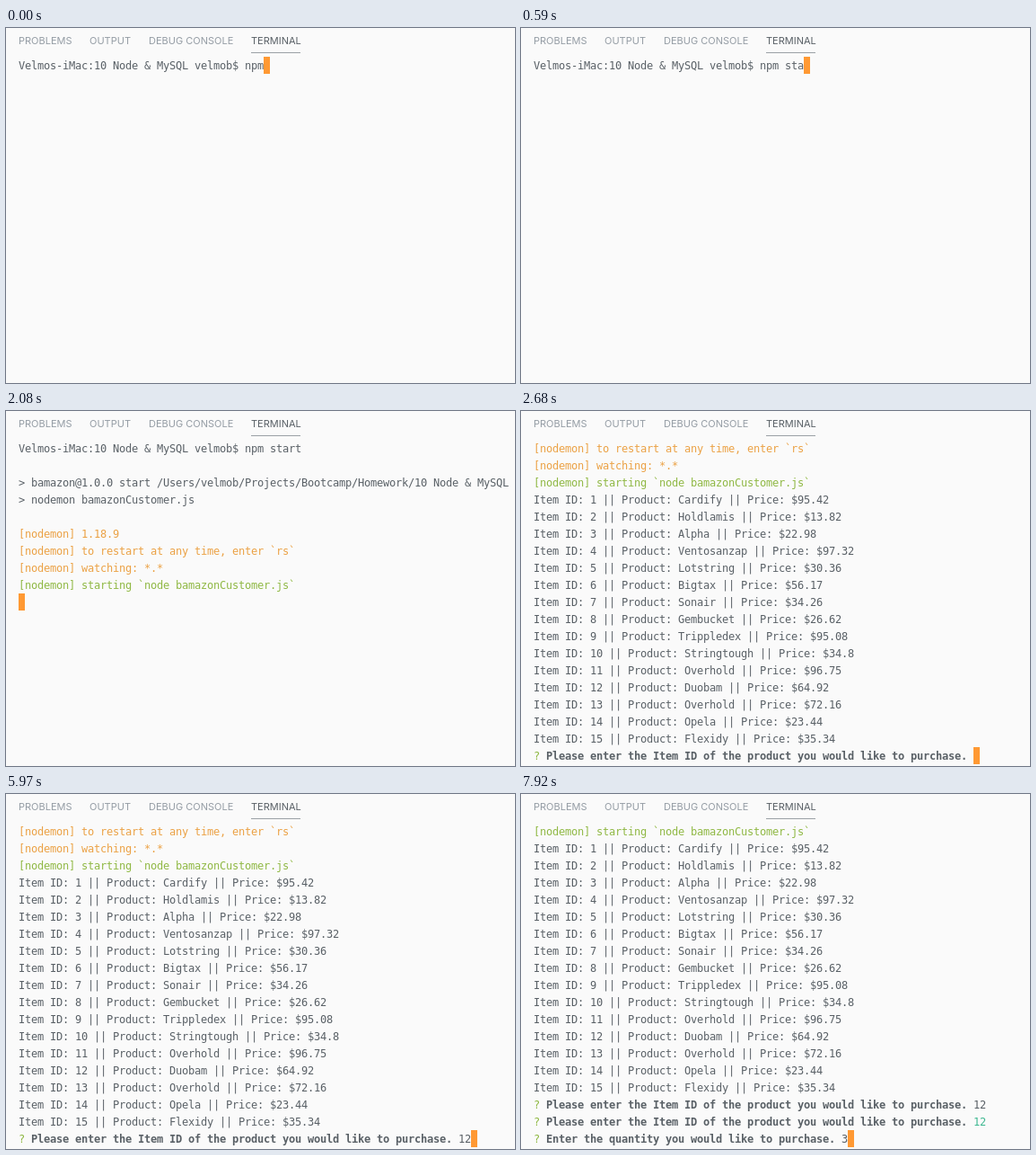
An HTML page for the animation above (8000 ms loop, 567x395 px).

```html
<!DOCTYPE html>
<html lang="en">
<head>
<meta charset="utf-8">
<title>Terminal</title>
<style>
  html, body { margin: 0; width: 100%; height: 100%; overflow: hidden; background: #fafafa; }
  #tabs span {
    position: absolute; top: 7px; white-space: pre;
    font: 11px/14px Inter, sans-serif; color: #959da5;
  }
  #tabs span.active { color: #596066; }
  #underline { position: absolute; left: 273px; top: 27px; width: 55px; height: 1px; background: #9ba1a6; }
  #screen {
    position: absolute; left: 14px; top: 32px;
    font: 12px/18px "DejaVu Sans Mono", monospace;
    letter-spacing: calc(7px - 1ch);
    font-variant-ligatures: none;
    color: #596066;
  }
  #screen div { box-sizing: border-box; height: 19px; padding-top: 1px; white-space: pre; }
  .yellow { color: #eba144; }
  .green { color: #8fb843; }
  .cyan { color: #3fb891; }
  #cursor { position: absolute; width: 7px; height: 19px; background: #ff9933; }
</style>
</head>
<body>
<div id="tabs">
  <span style="left:14px">PROBLEMS</span>
  <span style="left:93px">OUTPUT</span>
  <span style="left:159px">DEBUG CONSOLE</span>
  <span class="active" style="left:273px">TERMINAL</span>
</div>
<div id="underline"></div>
<div id="cursor"></div>
<div id="screen"></div>
<script>
const LOOP = 8000, ROWS = 19, CELL_W = 7, CELL_H = 19, LEFT = 14, TOP = 32;

const paint = (color, text) => `<span class="${color}">${text}</span>`;
const log = (color, text) => paint(color, `[nodemon] ${text}`) + '\n';
const ask = text => `${paint('green', '?')} <b>${text}</b> `;

const products = [
  ['Cardify', '95.42'], ['Holdlamis', '13.82'], ['Alpha', '22.98'],
  ['Ventosanzap', '97.32'], ['Lotstring', '30.36'], ['Bigtax', '56.17'],
  ['Sonair', '34.26'], ['Gembucket', '26.62'], ['Trippledex', '95.08'],
  ['Stringtough', '34.8'], ['Overhold', '96.75'], ['Duobam', '64.92'],
  ['Overhold', '72.16'], ['Opela', '23.44'], ['Flexidy', '35.34']
];
const listing = products
  .map(([name, price], i) => `Item ID: ${i + 1} || Product: ${name} || Price: $${price}\n`)
  .join('');

const askItem = ask('Please enter the Item ID of the product you would like to purchase.');
const askQuantity = ask('Enter the quantity you would like to purchase.');

// Each entry appends output to the terminal at the given time.
const output = [
  [0, 'Velmos-iMac:10 Node &amp; MySQL velmob$ npm'],
  [150, ' '], [300, 's'], [450, 't'], [590, 'a'], [740, 'r'], [890, 't'],
  [1180, '\n'],
  [1630, '\n&gt; bamazon@1.0.0 start /Users/velmob/Projects/Bootcamp/Homework/10 Node &amp; MySQL\n' +
         '&gt; nodemon bamazonCustomer.js\n\n'],
  [2080, log('yellow', '1.18.9') +
         log('yellow', 'to restart at any time, enter `rs`') +
         log('yellow', 'watching: *.*') +
         log('green', 'starting `node bamazonCustomer.js`')],
  [2680, listing + askItem],
  [5820, '1'], [5970, '2'],
  [6270, '\n' + askItem + paint('cyan', '12') + '\n' + askQuantity],
  [7920, '3']
];

const screen = document.getElementById('screen');
const cursor = document.getElementById('cursor');
let shown = 0;

function render(time) {
  const written = output.filter(([start]) => start <= time);
  if (written.length === shown) return;
  shown = written.length;
  const rows = written.map(([, text]) => text).join('').split('\n').slice(-ROWS);
  screen.innerHTML = rows.map(row => `<div>${row}</div>`).join('');
  const column = screen.lastElementChild.textContent.length;
  cursor.style.left = LEFT + column * CELL_W + 'px';
  cursor.style.top = TOP + (rows.length - 1) * CELL_H + 'px';
}

const origin = performance.now();
function tick() {
  render((performance.now() - origin) % LOOP);
  requestAnimationFrame(tick);
}
tick();
</script>
</body>
</html>
```
